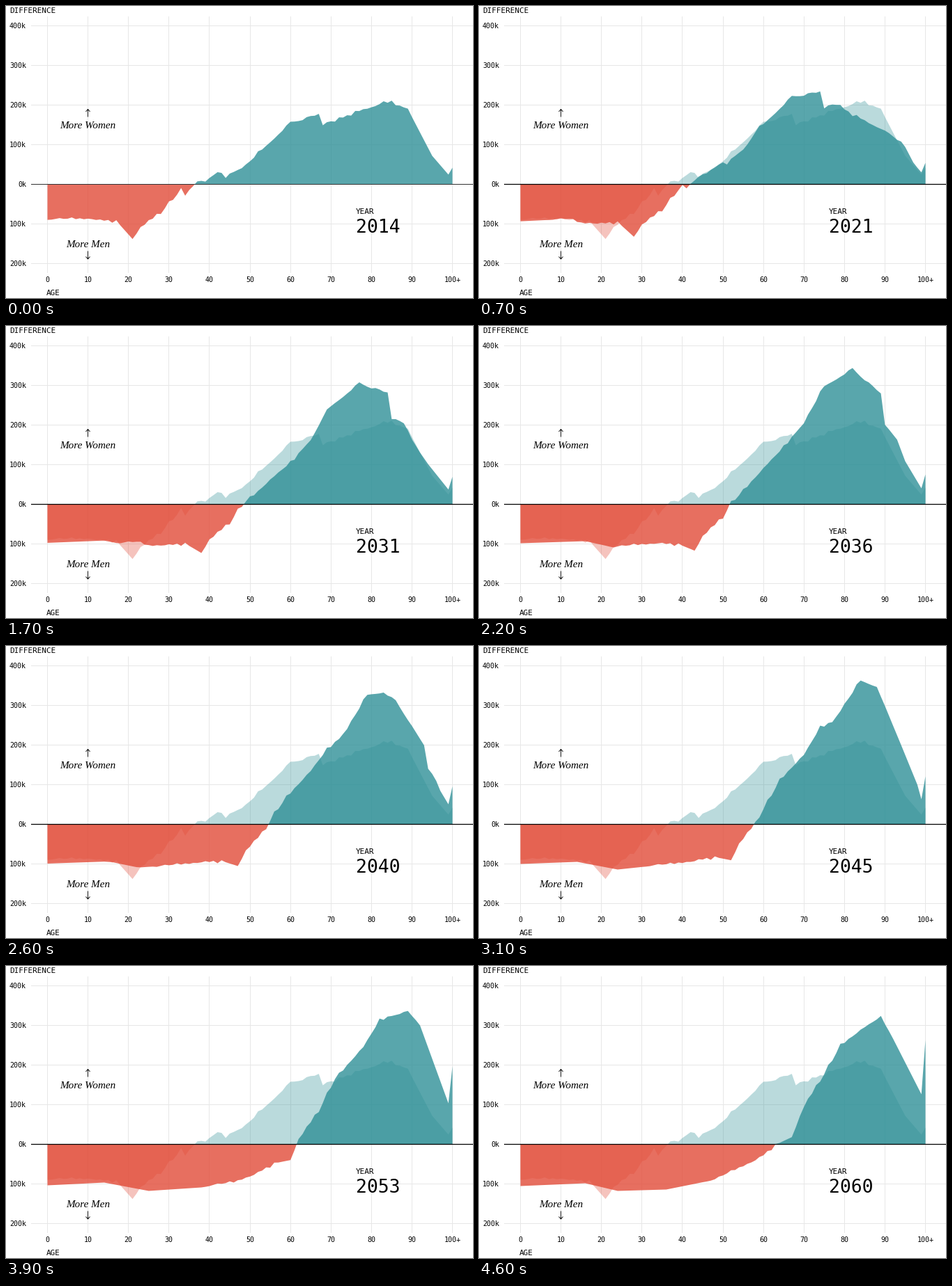
These frames come from a looping animation (670 px wide and 420 px high, 4700 ms). A matplotlib script:

```python
import matplotlib.pyplot as plt
import numpy as np
from matplotlib.animation import FuncAnimation

W, H, DPI = 670, 420, 100
PT = 72 / DPI
FIRST, LAST = 2014, 2060
X0, X_STEP = 59.5, 5.81      # age 0 and pixels per year of age
ZERO, Y_STEP = 256.5, 57     # zero line and pixels per 100k
TEAL, RED, GRID = "#2f9097", "#e24b38", "#e7e7e7"
MONO, SERIF = "DejaVu Sans Mono", "Liberation Serif"

AGES = np.arange(101)
FINE = np.linspace(0, 100, 2001)
curves = {}


def curve(year, *points):
    """Register key points of (age, height in pixels above zero)."""
    curves[year] = np.interp(AGES, *zip(*points))


curve(2014, (0, -51), (11, -48), (17, -55), (21, -76), (23, -61), (28, -41),
      (33, -7), (34, -15), (37, 4), (39, 3), (42, 18), (44, 11), (49, 28),
      (60, 89), (67, 100), (68, 87), (84, 120), (89, 108), (95, 41),
      (99, 14), (100, 24))
curve(2027, (0, -55), (18, -50), (21, -60), (30, -58), (34, -70), (36, -54),
      (41, -34), (45, -2), (48, 8), (57, 47), (62, 81), (64, 107), (73, 158),
      (80, 160), (81, 132), (84, 138), (88, 100), (99, 20), (100, 37))
curve(2036, (0, -56), (16, -53), (23, -62), (34, -54), (43, -64), (45, -45),
      (50, -19), (52, 2), (61, 57), (67, 96), (70, 118), (75, 170), (82, 195),
      (89, 159), (90, 115), (93, 93), (95, 62), (99, 23), (100, 43))
curve(2045, (0, -57), (14, -54), (24, -65), (37, -57), (44, -50), (52, -49),
      (54, -27), (58, 1), (64, 64), (70, 99), (74, 140), (77, 147), (84, 207),
      (88, 198), (94, 114), (98, 57), (99, 36), (100, 69))
curve(2053, (0, -59), (14, -55), (25, -67), (38, -62), (46, -54), (60, -20),
      (62, 8), (67, 48), (71, 95), (78, 139), (82, 179), (89, 192), (92, 171),
      (99, 59), (100, 112))
curve(2060, (0, -60), (16, -56), (24, -67), (36, -65), (48, -51), (60, -15),
      (67, 13), (70, 55), (75, 101), (79, 143), (89, 184), (92, 152),
      (99, 72), (100, 150))

# small bumps that follow each birth cohort, from 1914 to the first year
ripple = np.random.default_rng(4).normal(0, 1.4, FIRST - 1913)


def heights(year):
    """Blend neighbouring curves, letting each birth cohort age along."""
    a = max(k for k in curves if k <= year)
    b = min(k for k in curves if k >= year)
    past, left = year - a, b - year
    u = past / max(b - a, 1)
    # cohorts born after the first year are stationary by age
    shift = np.minimum.reduce([AGES / max(past, 1), (99 - AGES) / max(left, 1),
                               1 - (year - FIRST - AGES) / 5])
    shift = np.clip(shift, 0, 1)
    start = np.interp(AGES - past * shift, AGES, curves[a])
    end = np.interp(AGES + left * shift, AGES, curves[b])
    born = year - AGES
    bumps = np.where(born <= FIRST, ripple[np.clip(born, 1914, FIRST) - 1914], 0)
    fade = np.clip((92 - AGES) / 8, 0, 1)
    return (1 - u) * start + u * end + bumps * fade


def outline(h, sign):
    y = np.interp(FINE, AGES, h)
    y = ZERO - sign * np.maximum(sign * y, 0)
    x = X0 + X_STEP * FINE
    return np.column_stack([np.r_[x[0], x, x[-1]], np.r_[ZERO, y, ZERO]])


fig = plt.figure(figsize=(W / DPI, H / DPI), dpi=DPI, facecolor="white")
ax = fig.add_axes([0, 0, 1, 1])
ax.set_xlim(0, W)
ax.set_ylim(H, 0)
ax.axis("off")


def line(xs, ys, color="black", width=1, z=5):
    return ax.plot(xs, ys, color=color, lw=width * PT, zorder=z, snap=False,
                   solid_capstyle="butt")[0]


def label(x, y, s, size, ha="left", font=MONO, style="normal"):
    return ax.text(x, y, s, fontsize=size * PT, ha=ha, va="baseline",
                   family=font, style=style, color="black", zorder=6)


def area(sign, alpha, z):
    shape = plt.Polygon(outline(heights(FIRST), sign), closed=True, lw=0,
                        fc=TEAL if sign > 0 else RED, alpha=alpha, zorder=z)
    return ax.add_patch(shape)


def arrow(tail, tip):
    back = tip + 3.5 * np.sign(tail - tip)
    line([117.5, 117.5], [tail, tip], width=0.9)
    line([114.5, 117.5, 120.5], [back, tip, back], width=0.9)


for n in range(-2, 5):
    y = ZERO - n * Y_STEP
    line([36, W], [y, y], GRID, z=1)
    label(29, y + 3.5, f"{abs(n) * 100}k", 10, "right")

for age in range(0, 101, 10):
    x = X0 + X_STEP * age
    mid = np.floor(x) + 0.5    # pixel centre keeps the line crisp
    line([mid, mid], [15, 384], GRID, z=1)
    label(x, 397, "100+" if age == 100 else str(age), 10, "center")

label(5, 10, "DIFFERENCE", 11)
label(57.5, 416, "AGE", 11)
label(502, 299, "YEAR", 11)
label(117.3, 176, "More Women", 15.1, "center", SERIF, "italic")
label(117.3, 347, "More Men", 15.1, "center", SERIF, "italic")
arrow(159.5, 148.5)
arrow(352.5, 364)

ghosts = [area(s, 0.33, 2) for s in (1, -1)]
areas = {s: area(s, 0.8, 3) for s in (1, -1)}
axis = line([36, W], [ZERO, ZERO])
counter = label(502, 326, str(FIRST), 26.4)


def draw(i):
    h = heights(FIRST + i)
    for sign, shape in areas.items():
        shape.set_xy(outline(h, sign))
    for ghost in ghosts:
        ghost.set_visible(i > 0)
    axis.set_linewidth((1.25 if i else 1) * PT)
    axis.set_color("black" if i else "#333333")
    counter.set_text(str(FIRST + i))
    return [*areas.values(), *ghosts, axis, counter]


anim = FuncAnimation(fig, draw, frames=LAST - FIRST + 1, interval=100,
                     repeat=True, repeat_delay=0)
plt.show()
```
